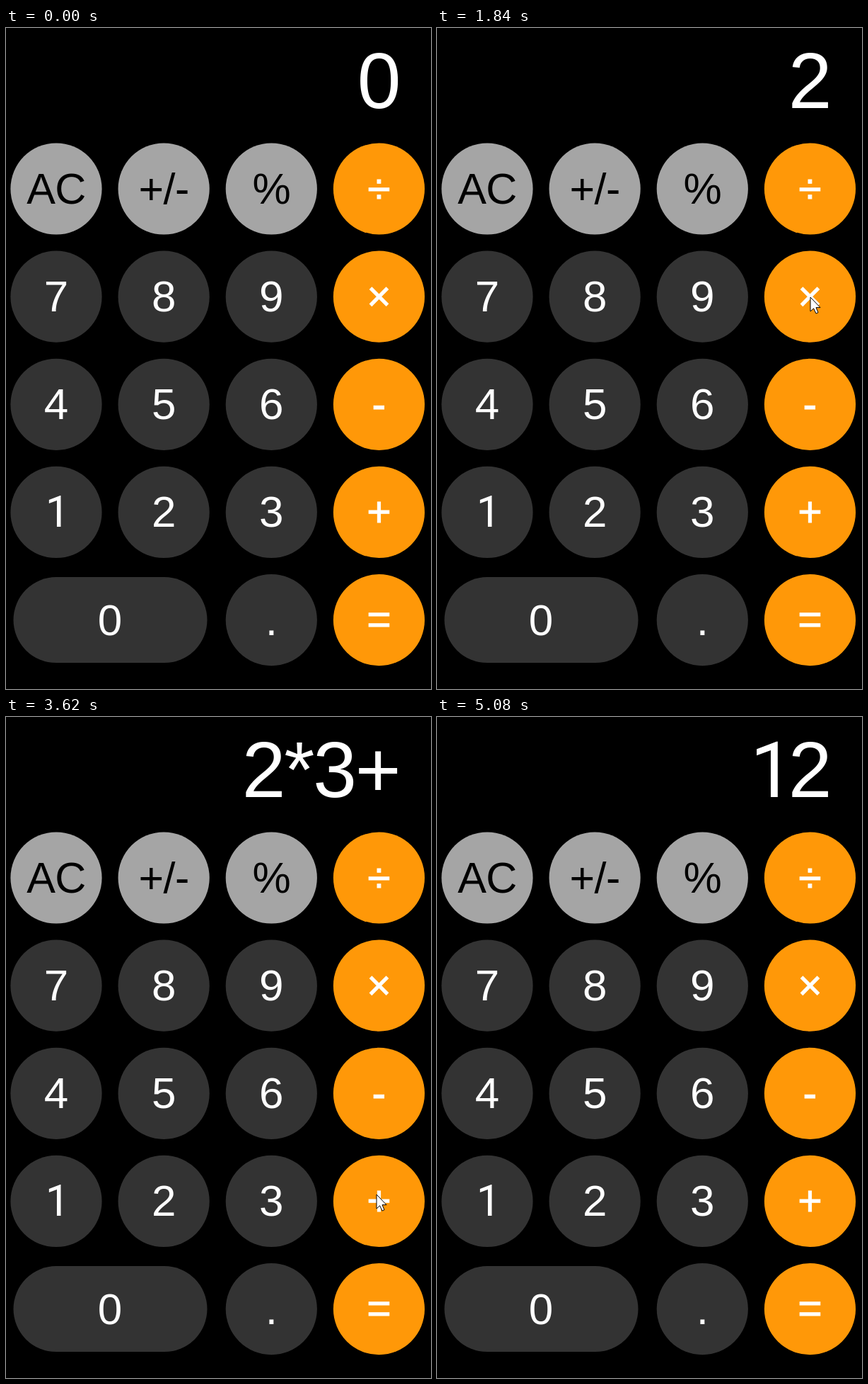
Animation, 601 px wide and 933 px high, one loop 5610 ms. Source, as an HTML page:

```html
<!DOCTYPE html>
<html lang="en">
<head>
<meta charset="utf-8">
<title>Calculator</title>
<style>
  html, body { margin: 0; width: 100%; height: 100%; overflow: hidden; background: #000; }
  svg { display: block; }
  text { font: 62px "Liberation Sans", Arial, sans-serif; text-anchor: middle; fill: #fff; }
  .gray > :first-child { fill: #a5a5a5; }
  .dark > :first-child { fill: #333; }
  .orange > :first-child { fill: #ff9808; }
  .gray text { fill: #000; font-size: 61px; letter-spacing: -.5px; }
  .orange text { font-size: 59px; stroke: #fff; stroke-width: 1px; }
  text.one { font-family: Roboto, sans-serif; font-size: 61px; }
  #display text { font-size: 111px; letter-spacing: -2.2px; text-anchor: end; }
  #display text.one { font-size: 109px; letter-spacing: 0; text-anchor: start; }
</style>
</head>
<body>
<svg width="601" height="933" viewBox="0 0 601 933">
  <g id="keys"></g>
  <g id="display">
    <text class="one" id="ten" x="443" y="112.5">1</text>
    <text id="shown" x="556.4" y="112.5">0</text>
  </g>
  <path id="cursor" d="M0 0V20L4.6 15.8L8 23L11 21.6L8 14.6H14Z" fill="#fff" stroke="#000"/>
</svg>
<script>
const LOOP = 5610;
const PITCH = 152.15;
const byId = id => document.getElementById(id);

function add(parent, name, attrs, label = '') {
  const node = document.createElementNS('http://www.w3.org/2000/svg', name);
  for (const key in attrs) node.setAttribute(key, attrs[key]);
  node.textContent = label;
  return parent.appendChild(node);
}

const rows = ['AC +/- % ÷', '7 8 9 ×', '4 5 6 -', '1 2 3 +', '0  . ='];

rows.forEach((row, r) => row.split(' ').forEach((label, c) => {
  if (!label) return;
  const wide = label === '0';
  const one = label === '1';
  const kind = c === 3 ? 'orange' : r === 0 ? 'gray' : 'dark';
  const x = wide ? 147 : 71 + c * PITCH;
  const y = 227 + r * PITCH;
  const key = add(byId('keys'), 'g', { class: kind });
  if (wide) add(key, 'rect', { x: 10.5, y: y - 60.5, width: 274, height: 121, rx: 60.5 });
  else add(key, 'circle', { cx: x, cy: y, r: 64.6 });
  const lift = kind === 'orange' ? 19.5 : 21;
  add(key, 'text', { class: one ? 'one' : '', x: one ? x + 2 : x, y: y + lift }, label);
}));

// Pointer stops: x, y, arrival, departure, and the display from departure on
const stops = [
  [444, 935, 0, 400],
  [216, 673, 900, 970, '2'],
  [197, 672, 1020, 1020],
  [602, 490, 1280, 1610],
  [527, 379, 1850, 1890, '2*'],
  [471, 597, 2240, 2240],
  [382, 668, 2560, 2580, '2*3'],
  [400, 669, 2730, 2900],
  [524, 674, 3460, 3490, '2*3+'],
  [524, 674, 3490, 3690],
  [388, 538, 3820, 3990, '2*3+6'],
  [529, 822, 4550, 4650, '12'],
  [450, 935, 5080, LOOP]
];

const easeOut = k => 1 - (1 - k) ** 1.4;

function pointerAt(t) {
  const i = stops.findIndex(stop => t < stop[3]);
  const [x, y, arrival] = stops[i];
  if (t >= arrival) return [x, y];
  const [x0, y0, , left] = stops[i - 1];
  const k = easeOut((t - left) / (arrival - left));
  return [x0 + (x - x0) * k, y0 + (y - y0) * k];
}

function displayAt(t) {
  const pressed = stops.filter(stop => stop[4] && stop[3] <= t).pop();
  return pressed ? pressed[4] : '0';
}

const start = performance.now();

function draw() {
  const t = (performance.now() - start) % LOOP;
  const value = displayAt(t);
  const teen = value[0] === '1';
  byId('shown').textContent = teen ? value.slice(1) : value;
  byId('ten').style.display = teen ? '' : 'none';
  byId('cursor').setAttribute('transform', `translate(${pointerAt(t).map(Math.round)})`);
  requestAnimationFrame(draw);
}
draw();
</script>
</body>
</html>
```
